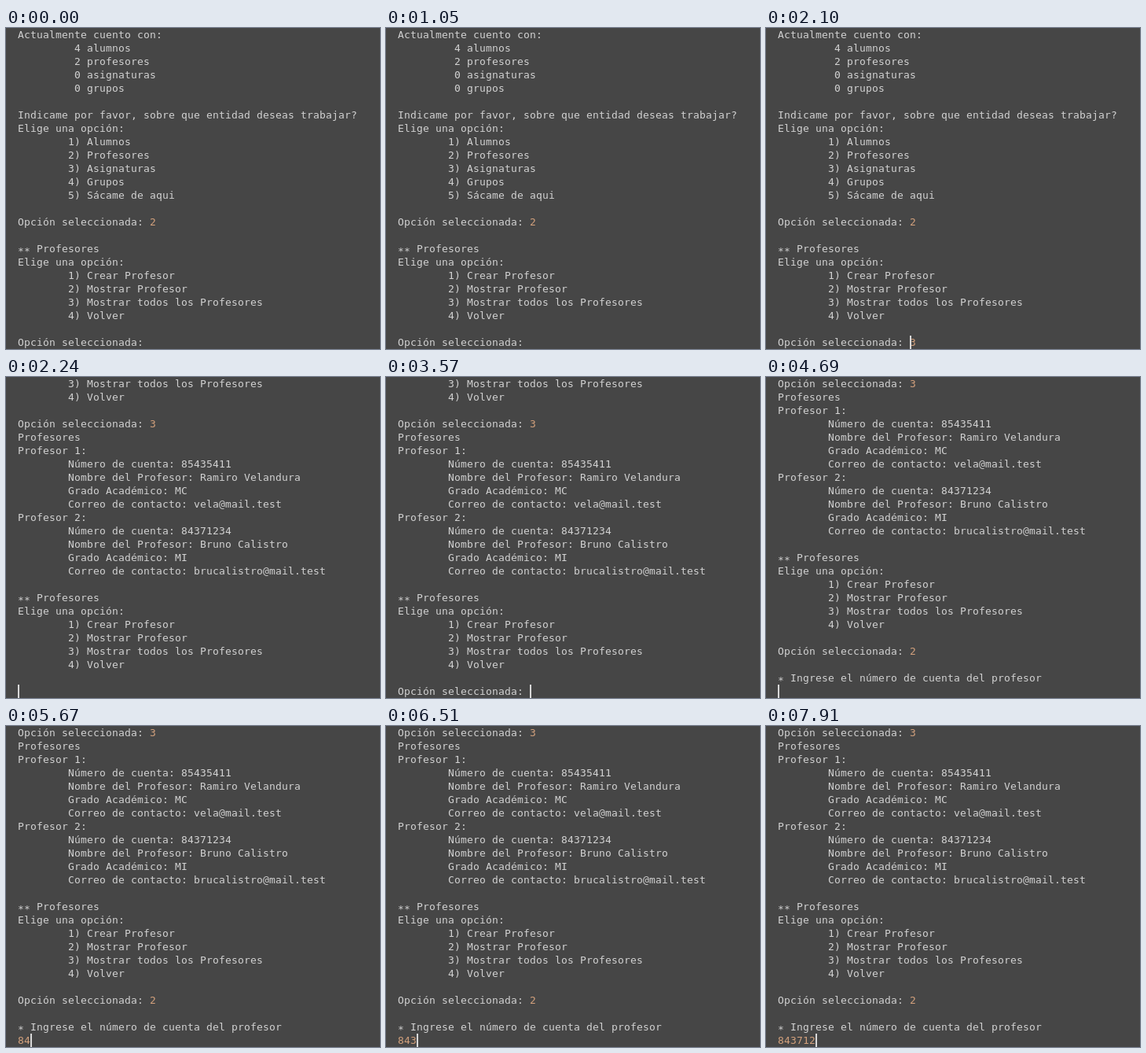
These frames come from a looping animation (476 by 408 pixels, 8000 ms). An HTML page:

```html
<!DOCTYPE html>
<html lang="es">
<head>
<meta charset="utf-8">
<title>Consola</title>
<style>
  html, body { margin: 0; width: 100%; height: 100%; overflow: hidden; background: #464646; }
  #console {
    position: absolute; left: 0; top: 0; width: 476px; height: 408px; overflow: hidden;
    color: #d2d2d2;
    font: 13px/17px "DejaVu Sans Mono", monospace;
    letter-spacing: calc(8px - 1ch);
    white-space: pre;
  }
  #rows { position: absolute; left: 15px; top: 0; }
  #rows div { height: 17px; }
  #rows b { font-weight: normal; position: relative; top: 3px; }
  #rows i { font-style: normal; color: #d2a07c; }
  #caret { position: absolute; top: 391px; width: 2px; height: 17px; background: #d8d8d8; }
</style>
</head>
<body>
<div id="console"><div id="rows"></div><div id="caret"></div></div>
<script>
const LOOP = 8000, ROWS = 24, CELL = 8, LEFT = 15;
const PROMPT = 'Opción seleccionada: ';

const indent = (cols, list) => list.map(s => ' '.repeat(cols) + s);
const options = list => ['Elige una opción:', ...indent(8, list.map((s, i) => `${i + 1}) ${s}`)), ''];
const teacher = (n, id, name, grade, mail) => [`Profesor ${n}:`, ...indent(8, [
  `Número de cuenta: ${id}`,
  `Nombre del Profesor: ${name}`,
  `Grado Académico: ${grade}`,
  `Correo de contacto: ${mail}`
])];
const teacherMenu = ['** Profesores',
  ...options(['Crear Profesor', 'Mostrar Profesor', 'Mostrar todos los Profesores', 'Volver'])];

// "|" separates printed text from typed text
const log = [
  'Actualmente cuento con:',
  ...indent(9, ['4 alumnos', '2 profesores', '0 asignaturas', '0 grupos']),
  '',
  'Indicame por favor, sobre que entidad deseas trabajar?',
  ...options(['Alumnos', 'Profesores', 'Asignaturas', 'Grupos', 'Sácame de aqui']),
  PROMPT + '|2',
  '',
  ...teacherMenu,
  PROMPT + '|3',
  'Profesores',
  ...teacher(1, '85435411', 'Ramiro Velandura', 'MC', 'vela@mail.test'),
  ...teacher(2, '84371234', 'Bruno Calistro', 'MI', 'brucalistro@mail.test'),
  '',
  ...teacherMenu,
  PROMPT + '|2',
  '',
  '* Ingrese el número de cuenta del profesor'
];

// time, first visible line, prompt, typed text, caret column (-1 = hidden)
const steps = [
  [0, 0, PROMPT, '', -1],
  [560, 0, PROMPT, '', 21],
  [1050, 0, PROMPT, '', -1],
  [1400, 0, PROMPT, '3', 22],
  [1890, 0, PROMPT, '3', -1],
  [2100, 0, PROMPT, '3', 21],
  [2240, 20, '', '', 0],
  [2520, 20, PROMPT, '', 21],
  [3010, 20, PROMPT, '', -1],
  [3570, 20, PROMPT, '', 21],
  [4060, 20, PROMPT, '', -1],
  [4130, 20, PROMPT, '2', 22],
  [4620, 20, PROMPT, '2', 21],
  [4690, 23, '', '', 0],
  [5180, 23, '', '', -1],
  [5320, 23, '', '8', 1],
  [5670, 23, '', '84', 2],
  [6160, 23, '', '84', -1],
  [6510, 23, '', '843', 3],
  [7070, 23, '', '843', -1],
  [7140, 23, '', '8437', 4],
  [7350, 23, '', '84371', 5],
  [7700, 23, '', '843712', 6]
];

const rows = document.getElementById('rows');
const caret = document.getElementById('caret');

function rowHtml(line) {
  const [text, typed = ''] = line.split('|');
  return `<div>${text.replace(/\*/g, '<b>*</b>')}<i>${typed}</i></div>`;
}

function show([, top, prompt, typed, col]) {
  const lines = [...log.slice(top, top + ROWS - 1), `${prompt}|${typed}`];
  rows.innerHTML = lines.map(rowHtml).join('');
  caret.style.visibility = col < 0 ? 'hidden' : 'visible';
  caret.style.left = LEFT + CELL * col + 'px';
}

const start = performance.now();
let current;
function tick() {
  const t = (performance.now() - start) % LOOP;
  const step = steps.findLast(s => s[0] <= t);
  if (step !== current) show(current = step);
  requestAnimationFrame(tick);
}
tick();
</script>
</body>
</html>
```
